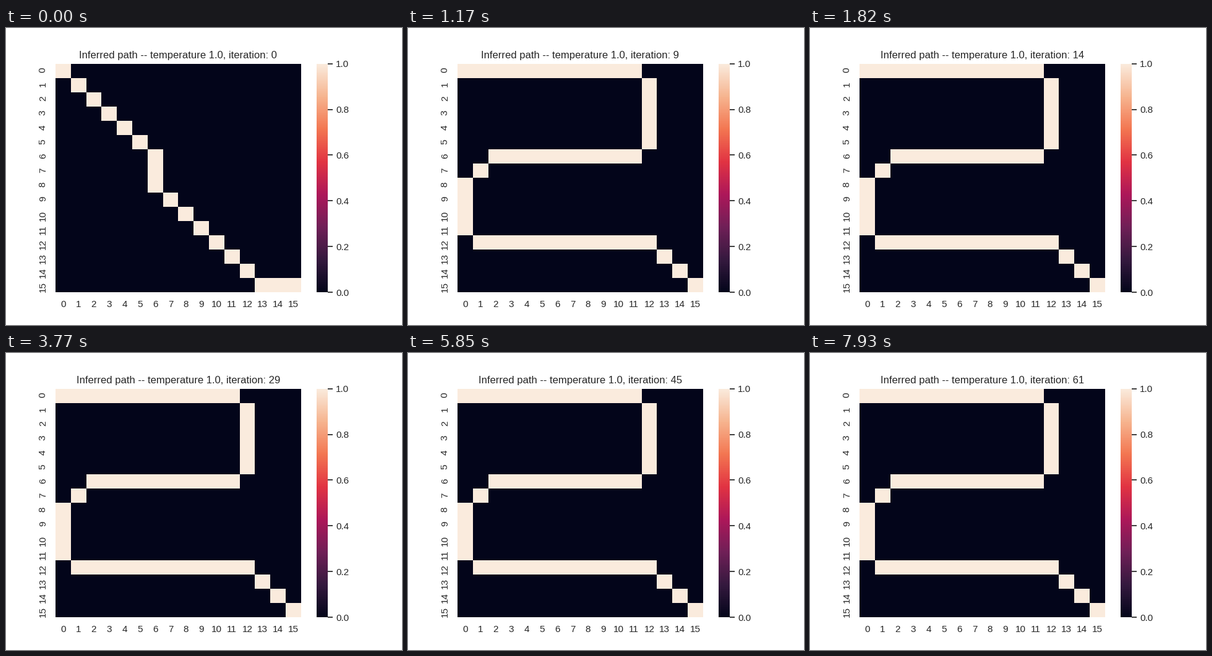
These frames come from a looping animation (640 px wide and 480 px high, 8 s). A matplotlib script:

```python
import numpy as np
import matplotlib.pyplot as plt
from matplotlib.animation import FuncAnimation
from matplotlib.colors import LinearSegmentedColormap

N = 16
LOOP, TICK, STEP = 8000, 20, 130  # ms
INK = "#262626"

plt.rcParams.update({
    "font.family": "Liberation Sans",
    "text.color": INK,
    "xtick.color": INK, "ytick.color": INK,
    "axes.titlesize": 12,
    "xtick.labelsize": 11, "ytick.labelsize": 11,
    "xtick.major.size": 6, "ytick.major.size": 6,
    "xtick.major.width": 1.25, "ytick.major.width": 1.25,
})

ROCKET = LinearSegmentedColormap.from_list("rocket", [
    "#03051a", "#35193e", "#701f57", "#ad1759",
    "#e13342", "#f37651", "#f6b48f", "#faebdd",
])


def walk(*stops):
    """Go from corner to corner by way of the stops, diagonally while possible."""
    grid = np.zeros((N, N))
    pos = np.array([0, 0])
    grid[0, 0] = 1
    for stop in (*stops, (N - 1, N - 1)):
        while (pos != stop).any():
            pos = pos + np.sign(stop - pos)
            grid[tuple(pos)] = 1
    return grid


# The path improves in stages, each lasting until the next one is found.
diagonal = walk((6, 6), (8, 6))
bent = walk((0, 5), (12, 12))
direct = walk((0, 10), (5, 12), (8, 11), (9, 12), (10, 11), (12, 12))
maze = walk((0, 11), (5, 12), (6, 2), (11, 0), (12, 12))


def path_at(k):
    if k < 2:
        return diagonal
    if k < 4:
        return bent
    return direct if k < 8 else maze


fig, ax = plt.subplots(figsize=(6.4, 4.8), dpi=100)
mesh = ax.pcolormesh(diagonal, cmap=ROCKET, vmin=0, vmax=1,
                     linewidths=0, edgecolor="white")
centres = np.arange(N) + 0.5
ax.set(xlim=(0, N), ylim=(N, 0))
ax.set_xticks(centres, range(N))
ax.set_yticks(centres, range(N))
ax.tick_params(left=False, bottom=False)
ax.tick_params(axis="y", labelrotation=90)
ax.spines[:].set_visible(False)
title = ax.set_title("")

bar = fig.colorbar(mesh, ax=ax)
bar.outline.set_linewidth(0)
bar.set_ticks(np.linspace(0, 1, 6))


def update(i):
    k = (i * TICK + TICK // 2) // STEP
    mesh.set_array(path_at(k))
    title.set_text(f"Inferred path -- temperature 1.0, iteration: {k}")
    return mesh, title


anim = FuncAnimation(fig, update, frames=LOOP // TICK, interval=TICK,
                     repeat=True, repeat_delay=0, blit=False)
plt.show()
```
